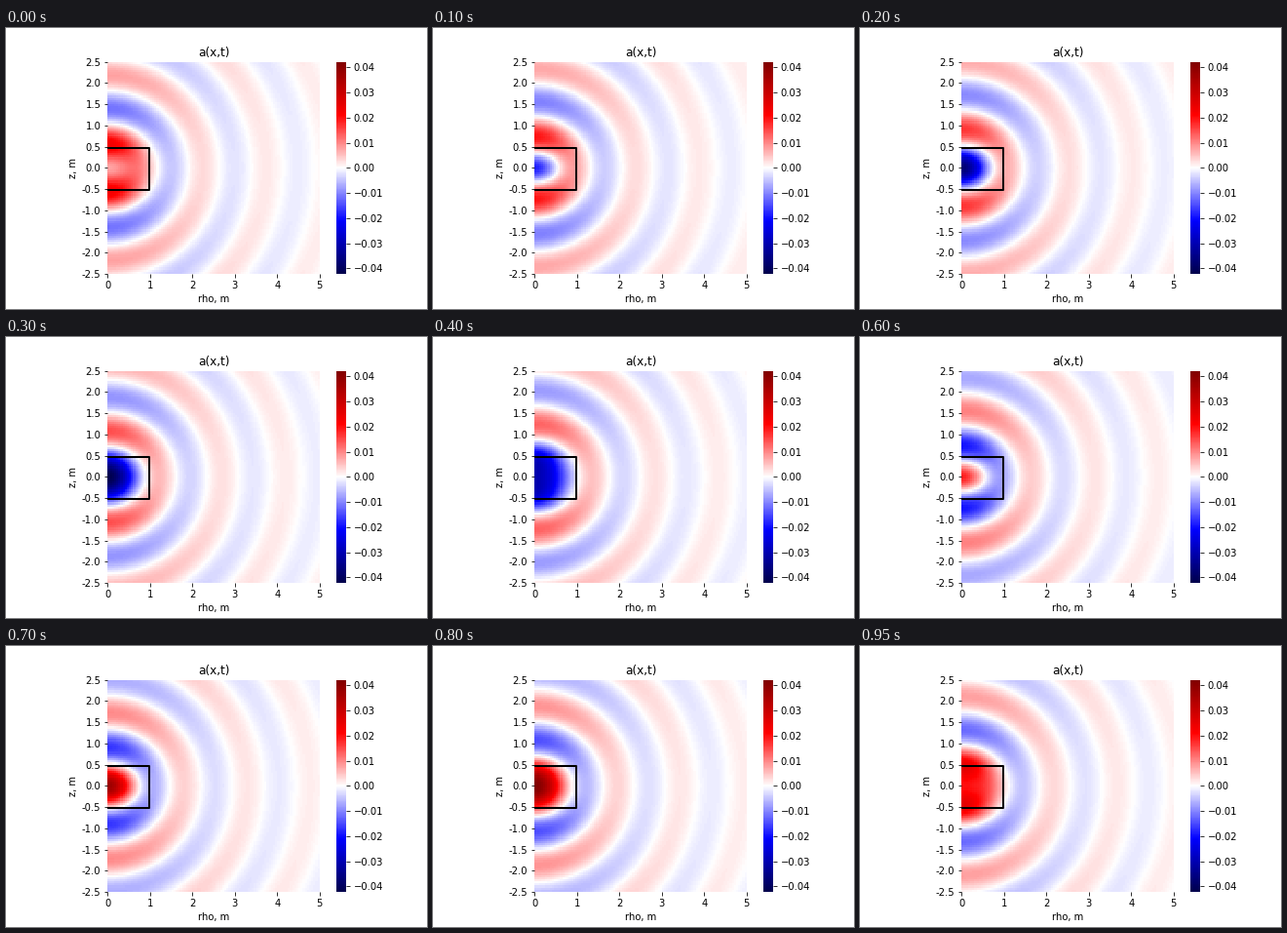
Animation, 432 px wide and 288 px high, one loop 1000 ms. Source, as a matplotlib script:

```python
import numpy as np
import matplotlib.pyplot as plt
from matplotlib.animation import FuncAnimation

FRAMES = 20
INTERVAL = 50
CELLS = 100
STEP = 5 / CELLS
K = 4.2            # wave number, 1/m
PEAK = 0.0422
TM, TE = 2.405, 3.832   # radial mode numbers of the two cavity modes


def bessel(n, x):
    theta = (np.arange(200) + 0.5) * np.pi / 200
    return np.cos(n * theta - x[:, None] * np.sin(theta)).mean(axis=1)


def radial_source(rho):
    ratio = np.hypot(TE, np.pi) / TE
    return (bessel(0, TM * rho) * bessel(0, TE * rho)
            + ratio * bessel(1, TM * rho) * bessel(1, TE * rho))


def disk_field(rho, heights):
    """Outgoing wave of a thin source disk at each height above it."""
    src = (np.arange(40) + 0.5) / 40
    phi = (np.arange(80) + 0.5) * np.pi / 80
    weight = (radial_source(src) * src).astype(np.float32)
    r, s, p = rho[:, None, None], src[:, None], phi
    flat = (r**2 + s**2 - 2 * r * s * np.cos(p)).astype(np.float32)
    rows = []
    for h in heights:
        d = np.sqrt(flat + np.float32(h * h))
        ring = (np.cos(K * d) / d).mean(axis=2) + 1j * (np.sin(K * d) / d).mean(axis=2)
        rows.append(ring @ weight)
    return np.array(rows)


def cavity_field():
    """Complex amplitude on the z, rho grid; z runs upwards."""
    rho = (np.arange(CELLS) + 0.5) * STEP
    half = CELLS // 2
    disk = disk_field(rho, (np.arange(half + 10) + 0.5) * STEP)
    upper = np.zeros((half, CELLS), complex)
    for shift in range(-9, 10):
        row = np.arange(half) - shift
        row = np.where(row < 0, -row - 1, row)
        upper += np.cos(np.pi * shift * STEP) * disk[row]
    return np.vstack([upper[::-1], upper])


amplitude = cavity_field()
amplitude *= PEAK / np.abs(amplitude).max()


def wave(frame):
    return -(amplitude * np.exp(-2j * np.pi * frame / FRAMES)).real


fig, ax = plt.subplots(figsize=(6, 4), dpi=72)
fig.subplots_adjust(left=0.125, right=0.9, bottom=0.125, top=0.88)
edges = np.linspace(0, 5, CELLS + 1)
mesh = ax.pcolormesh(edges, edges - 2.5, wave(0), cmap="seismic",
                     vmin=-PEAK, vmax=PEAK)
bar = fig.colorbar(mesh, ax=ax, ticks=np.arange(-4, 5) / 100)
bar.outline.set_visible(False)

# Cavity outline
ax.plot([0, 0.975, 0.975, 0], [0.475, 0.475, -0.525, -0.525], color="black", lw=2)

ax.set_aspect("equal")
ax.set(xlim=(0, 5), ylim=(-2.5, 2.5), title="a(x,t)", xlabel="rho, m", ylabel="z, m")
ax.set_xticks(range(6))
z_ticks = np.arange(-5, 6) / 2
ax.set_yticks(z_ticks, [f"{z:.1f}" for z in z_ticks])
ax.spines[:].set_visible(False)


def update(frame):
    mesh.set_array(wave(frame))
    return [mesh]


anim = FuncAnimation(fig, update, frames=FRAMES, interval=INTERVAL,
                     repeat=True, repeat_delay=0)
plt.show()
```
